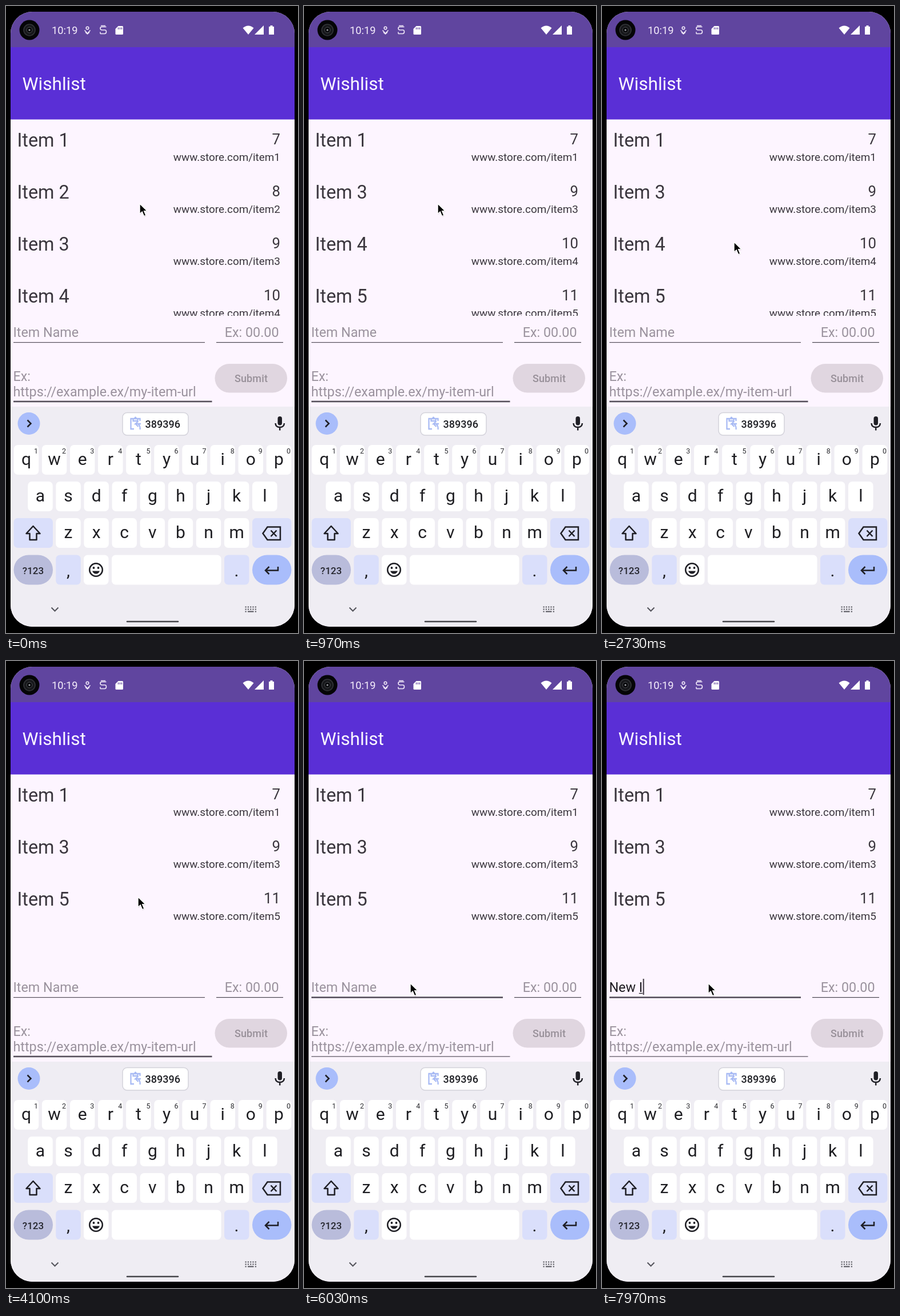
Write an HTML page that moves like this. It is 511x1097 px and loops after 8000 ms.

```html
<!DOCTYPE html>
<html lang="en">
<head>
<meta charset="utf-8">
<title>Wishlist</title>
<style>
  html, body { margin: 0; width: 100%; height: 100%; overflow: hidden; background: #000; }
  svg { display: block; width: 511px; height: 1097px; font-family: Roboto, "Liberation Sans", sans-serif; }
  text { white-space: pre; }
  .line { fill: none; stroke: #1f1f25; stroke-width: 2.5; }
  .hint { fill: #9a929d; font-size: 23.3px; }
  .key { font-size: 30px; fill: #1e1e22; text-anchor: middle; }
</style>
</head>
<body>
<svg viewBox="0 0 511 1097">
  <defs>
    <clipPath id="screen"><rect x="8" y="10" width="497" height="1076" rx="38"/></clipPath>
    <clipPath id="list"><rect x="8" y="198" width="497" height="344"/></clipPath>
  </defs>

  <g clip-path="url(#screen)">
    <rect x="8" y="10" width="497" height="1076" fill="#fdf5ff"/>
    <rect x="8" y="10" width="497" height="62" fill="#60459f"/>
    <rect x="8" y="72" width="497" height="126.500" fill="#5a2fd6"/>
    <rect x="8" y="701" width="497" height="386" fill="#efedf3"/>
  </g>

  <g id="status">
    <circle cx="41" cy="42" r="17.500" fill="#050507"/>
    <circle cx="41" cy="42" r="10" fill="#17181b" stroke="#34363a" stroke-width="1.500"/>
    <circle cx="41" cy="42" r="5" fill="#08090b" stroke="#4a4c50"/>
    <circle cx="41" cy="42" r="1.600" fill="#9a9ca2"/>
    <text x="80" y="49" font-size="18.300" fill="#f6effc">10:19</text>
    <g fill="none" stroke="#f0e8f8" stroke-width="1.600">
      <circle cx="142.500" cy="38.500" r="2.300"/>
      <path d="M137.500 42.500 142.500 48 147.500 42.500M139 46 142.500 49 146 46"/>
      <path d="M175.500 36.500H167.500Q165 36.500 165 39T167.500 42H173Q175.500 42 175.500 45T173 48.500H165M166 34.500H174M165 45.500V48.500"/>
    </g>
    <path d="M196.500 35H203.500Q205 35 205 36.500V48.500Q205 50 203.500 50H193Q191.500 50 191.500 48.500V40Z" fill="#fff"/>
    <path d="M196.500 37.500v3.500M199.500 37.500v3.500M202.500 37.500v3.500" stroke="#60459f" stroke-width="1.300"/>
    <path d="M414.500 38.500Q424 30.500 433.500 38.500L424 50Z" fill="#fff"/>
    <path d="M451 34V50H435Z" fill="#fff"/>
    <path d="M462.500 34h4v2h2.500V50H460V36h2.500Z" fill="#fff"/>
  </g>

  <text x="28.500" y="147" font-size="31.600" fill="#fbf8ff">Wishlist</text>
  <g id="rows" clip-path="url(#list)" fill="#3a363d"></g>

  <g id="form">
    <text id="name" x="12.500" y="579" class="hint"></text>
    <path id="compose" stroke="#1d1b20" stroke-width="1.300"/>
    <path id="caret" stroke="#3b363f" stroke-width="2"/>
    <text x="477.500" y="579" class="hint" text-anchor="end">Ex: 00.00</text>
    <text x="12.500" y="656" class="hint">Ex:</text>
    <text x="12.500" y="683" class="hint">https://example.ex/my-item-url</text>
    <rect id="nameLine" x="13" width="335" fill="#554f5a"/>
    <rect x="368" y="588" width="117" height="1.200" fill="#49454f"/>
    <rect id="urlLine" x="13" width="347.500" fill="#554f5a"/>
    <rect x="365.500" y="626" width="126.500" height="50.500" rx="25.200" fill="#e0d6e0"/>
    <text x="429" y="657.500" font-size="18" font-weight="500" letter-spacing=".13" fill="#989099" text-anchor="middle">Submit</text>
  </g>

  <g id="toolbar">
    <circle cx="40" cy="730.500" r="19.500" fill="#a9bdfb"/>
    <path class="line" d="M37.500 724.500 43.500 730.500 37.500 736.500"/>
    <rect x="204" y="711.500" width="115" height="39.500" rx="8" fill="#fff" stroke="#d3d2da" stroke-width="1.500"/>
    <path d="M224 740H218.500V722H234.500V726M222.500 722.500v3.500h8v-3.500M236 731H226.500L231.500 726.500M226.500 731 231.500 736M231 731Q235.500 735 234.500 741" fill="none" stroke="#a9bbf4" stroke-width="2.300"/>
    <circle cx="226.500" cy="720.500" r="2" fill="#a9bbf4"/>
    <text x="243.500" y="738" font-size="18" font-weight="500" fill="#202126">389396</text>
    <rect x="475.500" y="718" width="7.500" height="15.500" rx="3.750" fill="#1f1f25"/>
    <path class="line" d="M471.500 730Q472 737 479.200 737T487 730M479.200 737V742.500"/>
  </g>

  <g id="keys"></g>

  <g id="keyIcons">
    <path class="line" d="M47.500 910 59.500 923H53.500V934H41.500V923H35.500Z" stroke-linejoin="round"/>
    <path class="line" d="M457.500 911.500H480V934H457.500L449.500 922.700ZM463.500 917.500 473.500 928M473.500 917.500 463.500 928"/>
    <path class="line" d="M476 981V987.500H454.500M460.500 981 454 987.500 460.500 994"/>
    <circle class="line" cx="157.500" cy="986.500" r="11.300"/>
    <circle cx="153.500" cy="983" r="1.900" fill="#1f1f25"/>
    <circle cx="161.500" cy="983" r="1.900" fill="#1f1f25"/>
    <path d="M151 988.500H164Q162 993.500 157.500 993.500T151 988.500Z" fill="#1f1f25"/>
  </g>

  <g id="navigation" fill="none" stroke="#55555c">
    <path d="M79.500 1052.500 85.500 1058.500 91.500 1052.500" stroke-width="2"/>
    <path d="M418.500 1051.500H438M418.500 1055.500H438" stroke-width="2.200" stroke-dasharray="2.200 2.100"/>
    <path d="M418.500 1059.500h2.200M423 1059.500H433.500M435.800 1059.500h2.200" stroke-width="2.200"/>
    <path d="M212 1077H301" stroke="#45454a" stroke-width="2.600" stroke-linecap="round"/>
  </g>

  <g id="pointer">
    <path d="M1 2V19.500L5.200 15.800 8.400 23.500 12 22 8.800 14.500H14.500Z" fill="#000" opacity=".15"/>
    <path d="M.6 .5V18L4.800 14.300 8 22 11.200 20.700 8 13.200H13.300Z" fill="#000" stroke="#fff" stroke-width="1.200"/>
  </g>
</svg>

<script>
const LOOP = 8000;
const $ = id => document.getElementById(id);

function add(parent, tag, attrs, text = "") {
  const el = document.createElementNS("http://www.w3.org/2000/svg", tag);
  for (const k in attrs) el.setAttribute(k, attrs[k]);
  el.textContent = text;
  return parent.appendChild(el);
}

// Keyboard
function keyBox(x, y, width, fill = "#fff", rx = 7) {
  add($("keys"), "rect", { x, y, width, height: 52, rx, fill });
}
const PITCH = 49.1;
[["qwertyuiop", 35.500], ["asdfghjkl", 60], ["zxcvbnm", 109]].forEach(([letters, start], row) => {
  [...letters].forEach((letter, i) => {
    const x = start + i * PITCH, y = 768 + row * 64;
    keyBox(x - 21.75, y, 43.5);
    add($("keys"), "text", { x, y: y + 35, class: "key" }, letter);
    if (row === 0) {
      add($("keys"), "text", { x: x + 17, y: y + 15, "font-size": 12.5, fill: "#2c2c31", "text-anchor": "middle" }, (i + 1) % 10);
    }
  });
});
keyBox(13.5, 896, 68.5, "#dadffb");
keyBox(431, 896, 68.5, "#dadffb");
keyBox(13.5, 960.5, 68.5, "#b9bcdb", 26);
keyBox(87.3, 960.5, 43.5, "#dadffb");
keyBox(136, 960.5, 43.5);
keyBox(185, 960.5, 191.5);
keyBox(382, 960.5, 43.5, "#dadffb");
keyBox(431, 960.5, 68.5, "#a9bdfb", 26);
add($("keys"), "text", { x: 47.5, y: 993.5, "font-size": 17, "font-weight": 500, fill: "#25262e", "text-anchor": "middle" }, "?123");
add($("keys"), "text", { x: 109, y: 998, class: "key", "font-size": 26 }, ",");
add($("keys"), "text", { x: 403.5, y: 998, class: "key", "font-size": 26 }, ".");

// Wishlist rows, one group per item
const rows = [1, 2, 3, 4, 5].map(n => {
  const g = add($("rows"), "g", {});
  add(g, "text", { x: 19.5, y: 245.5, "font-size": 32.4 }, "Item " + n);
  add(g, "text", { x: 480, y: 242, "font-size": 25.8, "text-anchor": "end" }, n + 6);
  add(g, "text", { x: 480, y: 271, "font-size": 18.9, "text-anchor": "end" }, "www.store.com/item" + n);
  return g;
});

const removedAt = { 2: 600, 4: 3400 };
const focusAt = 5350;
const typing = [[6900, "N"], [7100, "Ne"], [7300, "New"], [7540, "New "], [7800, "New I"]];
const path = [
  [0, 233.5, 345.5], [1500, 233.5, 345.5], [2100, 230.5, 412.5], [4300, 230.5, 412.5],
  [4750, 185.5, 566.5], [5150, 185.5, 566.5], [5300, 185.5, 563.5], [LOOP, 185.5, 563.5]
];

function pointerAt(t) {
  const i = path.findIndex(p => p[0] > t);
  const [t0, x0, y0] = path[i - 1], [t1, x1, y1] = path[i];
  const u = (t - t0) / (t1 - t0), e = u * u * (3 - 2 * u);
  return [x0 + (x1 - x0) * e, y0 + (y1 - y0) * e];
}

function setLine(id, bottom, focused) {
  const h = focused ? 2.6 : 1.2;
  $(id).setAttribute("y", bottom - (focused ? 1.3 : 0.6));
  $(id).setAttribute("height", h);
}

function drawName(t) {
  const step = typing.filter(s => s[0] <= t).pop();
  const typed = step ? step[1] : "";
  const label = $("name");
  label.textContent = typed || "Item Name";
  label.style.fill = typed ? "#1d1b20" : "";

  const end = 13.5 + (typed ? label.getComputedTextLength() : 0);
  const wordStart = typed.lastIndexOf(" ") + 1;
  const from = wordStart < typed.length ? label.getStartPositionOfChar(wordStart).x : end;
  $("compose").setAttribute("d", from < end ? `M${from} 581.5H${end - 1}` : "");

  const blinkOn = (t - (step ? step[0] : focusAt)) % 1000 < 500;
  $("caret").setAttribute("d", t >= focusAt && blinkOn ? `M${end + .5} 556V584` : "");
}

function draw(t) {
  let slot = 0;
  rows.forEach((g, i) => {
    const gone = t >= (removedAt[i + 1] ?? Infinity);
    g.setAttribute("display", gone ? "none" : "inline");
    if (!gone) g.setAttribute("transform", `translate(0 ${91 * slot++})`);
  });
  const focused = t >= focusAt;
  setLine("nameLine", 588.6, focused);
  setLine("urlLine", 692, !focused);
  drawName(t);
  $("pointer").setAttribute("transform", `translate(${pointerAt(t)})`);
}

const began = performance.now();
function tick() {
  draw((performance.now() - began) % LOOP);
  requestAnimationFrame(tick);
}
tick();
</script>
</body>
</html>
```
